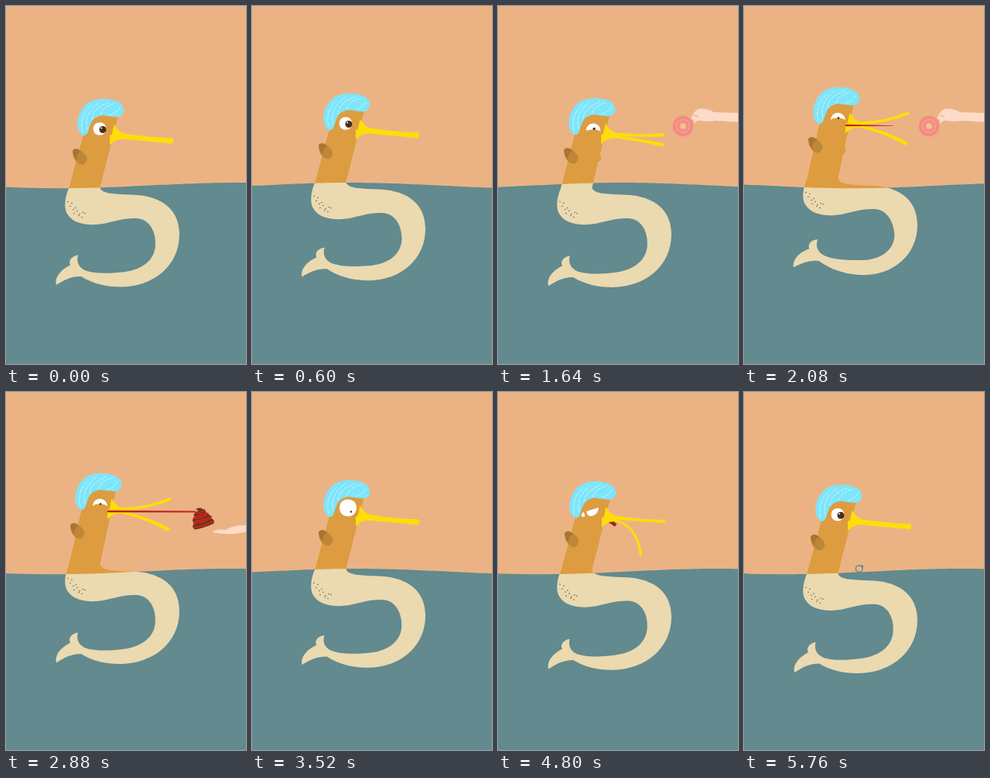
An HTML page that plays this animation: 310 px wide and 462 px high, repeating every 5800 ms.

```html
<!DOCTYPE html>
<html lang="en">
<head>
<meta charset="utf-8">
<title>Sea bird and the treat</title>
<style>
  html, body { margin: 0; width: 100%; height: 100%; overflow: hidden; background: #ebb384; }
  svg { display: block; width: 100vw; height: 100vh; }
</style>
</head>
<body>
<svg viewBox="0 0 310 462">
  <defs><clipPath id="aboveWater"><path id="air"/></clipPath></defs>
  <rect width="310" height="462" fill="#ebb384"/>
  <path id="water" fill="#628a8f"/>
  <path id="bodyWet" fill="#ebd9b0"/>
  <g id="dots" fill="#5d6258"></g>
  <g clip-path="url(#aboveWater)" fill="#dd9c40">
    <path id="bodyDry"/>
    <circle id="throat"/>
  </g>
  <circle id="bubble" r="4.3" fill="none" stroke="#4c8590" stroke-width="1.3"/>
  <circle id="bubbleDot" r="1.4" fill="#4c8590"/>

  <g id="giver">
    <path fill="#fddbc8" d="M312 138L279 137Q268 131 258 133Q249 140 247 152Q250 156 254 151Q257 147 263 148Q272 150 281 148L312 150Z"/>
    <path fill="none" stroke="#f3a9a0" stroke-width="1.2" d="M252 142Q256 139 259 144M250 150l3 -3"/>
  </g>
  <path id="palm" fill="#fddbc8" d="M267 181Q271 176 284 178Q294 171 312 172.5V180Q288 186 267 181Z"/>
  <g id="donut">
    <circle r="15" fill="#e9b27a"/>
    <circle r="13.2" fill="#f58a85"/>
    <circle r="8.5" fill="none" stroke="#fa9f98" stroke-width="1.5"/>
    <circle r="4.6" fill="#e9b27a"/>
    <circle r="3" fill="#f3c39b"/>
    <path id="shine" fill="#ecd5ea" d="M-15 -7Q-9 -12 -4 -11L-3 11Q-10 11 -15 6Z"/>
  </g>

  <g id="head">
    <path fill="#bd873a" d="M86 186Q90 181 96 186Q104 191 104.500 197Q103 203 99 204Q91 204 87 194Z"/>
    <path fill="#a8762f" d="M86 186Q91 181 97 187Q91 190 91 198Q86 192 86 186Z"/>
    <path fill="#7ee5fb" d="M98 166Q91 159 92.500 148Q95 131 108 123Q121 117 137 120.500Q152 124 152.500 134Q152 141 144 143Q134 142 124 140.500Q114 142 110 150Q107 158 105 164Q102 168 98 166Z"/>
    <path fill="none" stroke="#d0f6ff" stroke-width=".9" stroke-dasharray="5 1" d="M99 162Q94 142 110 128M105 159Q100 139 120 124M111 146Q112 131 133 124M122 140Q125 129 141 125M134 140Q144 137 148 129"/>
    <path id="eye" fill="#fff"/>
    <circle id="pupil" fill="#4a2e16"/>
    <circle id="glint" fill="#fff"/>
    <path id="tear" fill="#fff" d="M0 -3.500Q3 1 2 2.500Q0 4 -2 2.500Q-3 1 0 -3.500Z"/>
    <path id="limpTongue" fill="none" stroke="#a3271b" stroke-width="4.500" d="M138 169.500Q146 170 152 176"/>
    <path id="lowerBeak" fill="#ffdd08"/>
    <path id="upperBeak" fill="#ffdd08"/>
  </g>

  <g id="poop">
    <path fill="#69381f" d="M-7 -13Q1 -15 2 -12Q7 -10 7 -5Q13 -3 11 1Q17 4 14 9Q0 13 -11 13Q-16 8 -10 5Q-15 1 -9 -3Q-12 -7 -5 -9Q-2 -11 -7 -13Z"/>
    <path id="wrap" fill="none" stroke="#d0221d" stroke-width="2" d="M-8 -9Q2 -6 5 -11M-11 -2Q1 1 9 -6M-12 4Q3 7 13 -1M-13 10Q4 12 15 5M-9 -3L7 -6M-10 3L12 1"/>
  </g>
  <path id="tongue" fill="#c4221d"/>
</svg>
<script>
const LOOP = 5800, STEP = 40, TAU = Math.PI * 2;
const el = {};
document.querySelectorAll('[id]').forEach(node => el[node.id] = node);

const BODY = 'M104,150 L81,235 C76,246 74,262 80,269 C88,282 112,284 130,279.5 C145,276 155,273 168,273.5 ' +
  'C186,274 194,292 193,308 C192,330 172,341 150,343 C130,345 115,345 103,341 C96,338 90,332 93,321 ' +
  'C86,322 80,327 83,334 C74,338 62,348 65,359.5 C75,353 85,348 97,348.5 C112,358 130,362 148,362 ' +
  'C190,362 224,335 224,294 C224,258 195,243 160,243 C140,242 124,242 121.5,234 L145,142 L125,128 Z';
const DOTS = '80,252 85,254 83,258 87,262 90,260 88,267 92,264 95,268 99,266 102,267 98,272 94,270';

const EYE = {  // left corner, right corner, upper bulge, lower bulge, pupil x y r
  calm: [112.7, 158, 129.3, 158, -11, 11, 125, 159, 4.5],
  dome: [115, 162.5, 134, 163, -14, -5, 125, 159, 1.3],
  wide: [113, 155, 135, 155, -14.6, 14.6, 128, 160, 1.2],
  sad: [114.5, 158, 130, 153, 0, 11, 124, 159, 0]
};
const BEAK = {  // upper tip y, lower control point, lower tip
  shut: [172, 185, 172, 215, 175],
  open: [153, 182, 175, 213, 192],
  limp: [171, 180, 176, 185, 214]
};

const mix = (a, b, u) => Array.isArray(a) ? a.map((v, i) => mix(v, b[i], u)) : a + (b - a) * u;

function ease(t, ...keys) {
  if (t <= keys[0][0]) return keys[0][1];
  for (let i = 1; i < keys.length; i++) {
    const [t0, a] = keys[i - 1], [t1, b] = keys[i];
    if (t < t1) {
      const u = (t - t0) / (t1 - t0);
      return mix(a, b, u * u * (3 - 2 * u));
    }
  }
  return keys[keys.length - 1][1];
}

const set = (node, attrs) => { for (const k in attrs) node.setAttribute(k, attrs[k]); };
const show = (node, on) => node.setAttribute('visibility', on ? 'visible' : 'hidden');
const move = (node, x, y, more = '') => node.setAttribute('transform', `translate(${x} ${y}) ${more}`);

DOTS.split(' ').forEach(pair => {
  const [cx, cy] = pair.split(',');
  const dot = document.createElementNS('http://www.w3.org/2000/svg', 'circle');
  set(dot, { cx, cy, r: .8 });
  el.dots.append(dot);
});

function drawWater(t) {
  const trough = 70 + 460 * 6 * t / LOOP;
  let line = '';
  for (let x = -5; x <= 315; x += 5) {
    line += `L${x} ${(231.6 + 3.6 * Math.cos(TAU * (x - trough) / 460)).toFixed(2)}`;
  }
  set(el.water, { d: `M-5 470${line}L315 470Z` });
  set(el.air, { d: `M-5 0${line}L315 0Z` });
}

function drawBody(t, bob, lean) {
  const phase = TAU * 6 * t / LOOP;
  const swing = (2.8 - 2.8 * Math.cos(phase) + 4.6 * Math.sin(phase)) * Math.PI / 180;
  const warp = (_, px, py) => {
    let x = +px, y = +py;
    if (y < 234) {
      const w = Math.min(1, (234 - y) / 80);
      x -= 3 * lean * w;
      y -= 3 * lean * w;
    } else if (y > 300 && x < 215) {
      const a = swing * Math.min(1, (215 - x) / 45), dx = x - 190, dy = y - 343;
      x = 190 + dx * Math.cos(a) - dy * Math.sin(a);
      y = 343 + dx * Math.sin(a) + dy * Math.cos(a);
    }
    return `${x.toFixed(2)},${(y + bob).toFixed(2)}`;
  };
  const d = BODY.replace(/([\d.]+),([\d.]+)/g, warp);
  set(el.bodyWet, { d });
  set(el.bodyDry, { d });
  move(el.dots, 0, bob);
  const gulp = ease(t, [950, 0], [1150, 1], [2080, .9], [2350, 0]);
  set(el.throat, { cx: 124 + 6 * gulp - 2 * lean, cy: ease(t, [1150, 194], [2080, 198]) + bob, r: 4.5 * gulp });
}

function drawHead(t, bob, lean) {
  move(el.head, -3 * lean, bob - 3 * lean);

  const [lx, ly, rx, ry, up, down, px, py, pr] = ease(t, [1450, EYE.calm], [1700, EYE.dome], [3080, EYE.dome],
    [3250, EYE.wide], [4000, EYE.wide], [4250, EYE.sad], [5100, EYE.sad], [5300, EYE.calm]);
  set(el.eye, { d: `M${lx} ${ly}C${lx} ${ly + up} ${rx} ${ry + up} ${rx} ${ry}C${rx} ${ry + down} ${lx} ${ly + down} ${lx} ${ly}Z` });
  set(el.pupil, { cx: px, cy: py, r: pr });
  set(el.glint, { cx: px - pr * .4, cy: py - pr * .45, r: pr > 2 ? pr * .22 : 0 });

  show(el.tear, t >= 4400 && t < 5150);
  move(el.tear, 110, ease(t, [4400, 158], [4800, 162], [5150, 184]));

  let [tip, cx, cy, tx, ty] = ease(t, [1500, BEAK.shut], [1900, BEAK.open], [3060, BEAK.open], [3240, BEAK.shut],
    [4150, BEAK.shut], [4450, BEAK.limp], [5050, BEAK.limp], [5300, BEAK.shut]);
  const chew = t > 3240 && t < 4100 ? 1 - Math.cos(TAU * (t - 3240) / 287) : 0;
  ty += chew;
  tip -= chew * .6;
  const sag = (tip - 172) * .3;
  set(el.upperBeak, { d: `M134.5 172Q138 162 139.500 152Q145 162 153 164Q185 ${169 + sag} 214.500 ${tip - 2.2}Q218 ${tip} 215 ${tip + 2}Q185 ${171.5 + sag} 152 168.500Q143 168 134.500 172Z` });
  set(el.lowerBeak, { d: `M134 166L134 179Q141 171 151 171Q${cx - 1} ${cy + 2} ${tx - 2} ${ty + 2}Q${tx + 2} ${ty + 1.5} ${tx + 1} ${ty - 2}Q${cx} ${cy - 1.5} 150 167.500Z` });
  show(el.limpTongue, t >= 4300 && t < 5180);
}

function drawTreats(t) {
  const dx = ease(t, [900, 75], [1200, 23], [1450, 0]);
  const dy = ease(t, [900, 14], [1200, 11], [1450, 0]);
  const firstTreat = t >= 900 && t < 2320;
  show(el.giver, firstTreat);
  show(el.donut, firstTreat);
  show(el.shine, firstTreat && t < 1340);
  move(el.giver, dx, dy);
  move(el.donut, 239 + dx * 1.26, 155 + dy * .27,
    `scale(${ease(t, [1200, 1.22], [1420, 1])} ${ease(t, [1200, .5], [1420, 1])})`);

  show(el.palm, t >= 2320 && t < 3140);
  move(el.palm, ease(t, [2700, -26], [3060, 26], [3140, 50]), 0);

  const pull = ease(t, [2920, 0], [3100, 1]);
  show(el.poop, t >= 2320 && t < 3100);
  show(el.wrap, t >= 2760 && t < 3100);
  move(el.poop, mix(253, 150, pull), mix(163, 156, pull), `rotate(-8) scale(${1 - .6 * pull})`);
}

function drawTongue(t, bob) {
  const end = ease(t, [1900, 134], [2080, 193], [2620, 200], [2780, 245], [2920, 245], [3100, 140]);
  const y = 165.5 + bob, tipY = t > 2620 ? 154.5 : y + .5;
  const thick = t > 2620 ? 1 : .3;
  show(el.tongue, t >= 1900 && t < 3100);
  set(el.tongue, { d: `M131 ${y - 1.3}L${end} ${tipY - thick}V${tipY + thick}L131 ${y + 1.3}Z` });
}

function drawBubble(t) {
  const y = ease(t, [5600, 236], [5760, 228]);
  const on = t >= 5600;
  show(el.bubble, on);
  show(el.bubbleDot, on);
  set(el.bubble, { cx: 148.7, cy: y });
  set(el.bubbleDot, { cx: 152.8, cy: y - 3 });
}

function render(t) {
  const bob = -5.5 + 6 * Math.cos(TAU * 7 * t / LOOP);
  const lean = ease(t, [1500, 0], [1900, 1], [3050, 1], [3250, 0]);
  drawWater(t);
  drawBody(t, bob, lean);
  drawHead(t, bob, lean);
  drawTreats(t);
  drawTongue(t, bob);
  drawBubble(t);
}

const start = performance.now();
function tick() {
  const t = (performance.now() - start) % LOOP;
  render(t - t % STEP);
  requestAnimationFrame(tick);
}
tick();
</script>
</body>
</html>
```
